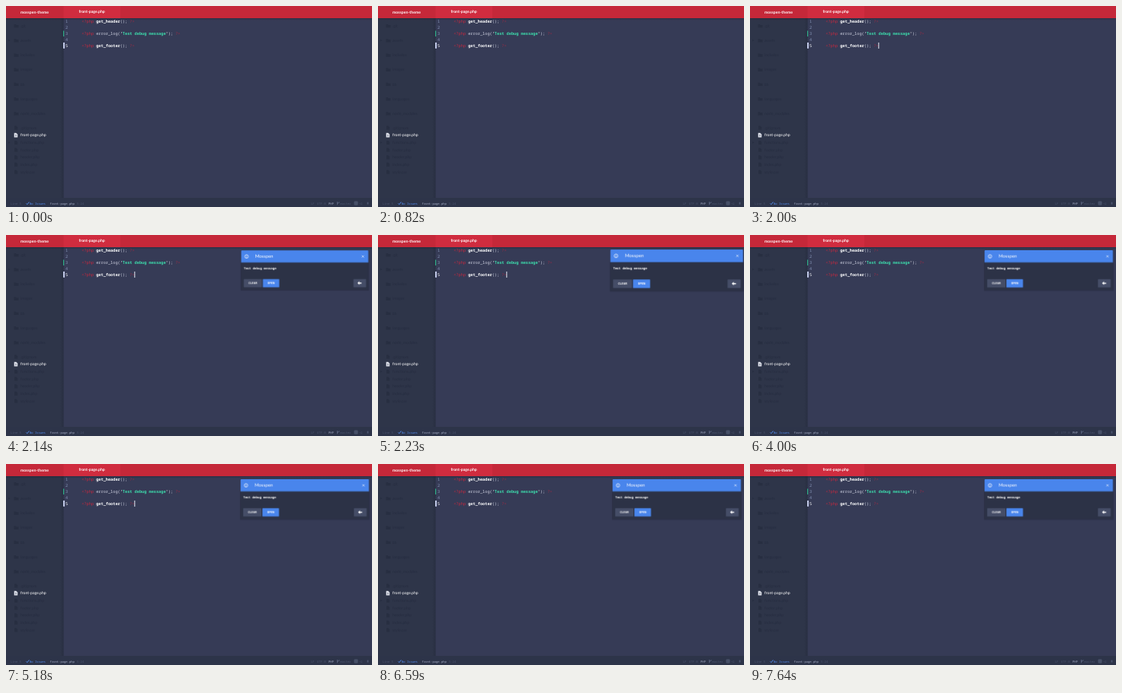
Recreate the animation shown at these times as an HTML page. Size 480x264 px, loop 7.69 s.

```html
<!DOCTYPE html>
<html lang="en">
<head>
<meta charset="utf-8">
<title>Debug notification</title>
<style>
  html, body { margin: 0; width: 100%; height: 100%; overflow: hidden; background: #363b56; }
  svg { display: block; width: 480px; height: 264px; }
  text { font: 5.15px Lato, sans-serif; fill: #fff; white-space: pre; text-rendering: geometricPrecision; }
  .title { font-weight: 700; text-anchor: middle; }
  .code text { font: 5.25px "Noto Sans Mono", monospace; fill: #d3d6e5; }
  .code .num { fill: #8795b8; }
  .code .now { fill: #fff; }
  .tag { fill: #c5293f; }
  .end { fill: #9d2b45; }
  .fn { fill: #fff; font-weight: 700; }
  .str { fill: #3ddcac; font-weight: 600; }
  .dim text { fill: #262d40; }
  .dim { fill: #272e41; }
  .bar text { font: 3.85px "Noto Sans Mono", monospace; fill: #4d5670; }
  .bar .blue { fill: #5590f5; }
  .bar .lit { fill: #a3abc4; }
  .panel .msg { font: 600 4px "Noto Sans Mono", monospace; }
  .panel .btn { font: 700 3.9px "Noto Sans Mono", monospace; text-anchor: middle; }
  .line { fill: none; stroke: #fff; stroke-width: .7; }

  .cursor { animation: blink 7690ms step-end infinite; }
  @keyframes blink {
    0%, 10.62%, 20.64%, 31.3%, 41.31%, 51.98%, 62.64%, 72.65%, 83.32%, 93.33%, 100% { opacity: 0; }
    5.29%, 15.96%, 25.97%, 36.63%, 46.65%, 57.31%, 67.32%, 77.98%, 88.65% { opacity: 1; }
  }
  .panel { transform-origin: 391.7px 46.3px; animation: pop 7690ms ease-in-out infinite; }
  @keyframes pop {
    0%, 27.78% { opacity: 0; transform: scale(.99); }
    27.79% { opacity: 1; transform: scale(.99); }
    28.9% { opacity: 1; transform: scale(1.033); }
    31.9%, 100% { opacity: 1; transform: scale(1); }
  }
</style>
</head>
<body>
<svg viewBox="0 0 480 264">
  <defs>
    <linearGradient id="edge">
      <stop offset="0" stop-color="#252b3d" stop-opacity="0"/>
      <stop offset="1" stop-color="#252b3d" stop-opacity=".6"/>
    </linearGradient>
    <linearGradient id="drop" x2="0" y2="1">
      <stop offset="0" stop-color="#1d2130" stop-opacity=".4"/>
      <stop offset="1" stop-color="#1d2130" stop-opacity="0"/>
    </linearGradient>
  </defs>

  <rect width="480" height="264" fill="#363b56"/>
  <rect width="75.5" height="264" fill="#2e3549"/>
  <rect x="71" width="4.5" height="264" fill="url(#edge)"/>

  <g class="dim" id="tree"></g>
  <path d="M10.7 166.8h2.7l1.8 1.8v3.9h-4.5z" fill="#e4e7f0"/>
  <path d="M12 169.3h2m-2 1.5h2" stroke="#2e3549" stroke-width=".5"/>
  <text x="19" y="171.4">front-page.php</text>

  <g class="code">
    <rect x="75" y="32.5" width="1.2" height="7.5" fill="#2fae88"/>
    <rect x="75" y="48" width="2" height="7.8" fill="#c3cbea"/>
    <text class="num" x="78" y="22.2">1</text>
    <text class="num" x="78" y="30.1">2</text>
    <text class="num" x="78" y="38">3</text>
    <text class="num" x="78" y="45.9">4</text>
    <text class="now" x="78" y="53.8" font-weight="700">5</text>
    <text x="99.3" y="22.2"><tspan class="tag">&lt;?php</tspan> <tspan class="fn">get_header</tspan>(); <tspan class="end">?&gt;</tspan></text>
    <text x="99.3" y="38"><tspan class="tag">&lt;?php</tspan> error_log(<tspan class="fn">'</tspan><tspan class="str">Test debug message</tspan><tspan class="fn">'</tspan>); <tspan class="end">?&gt;</tspan></text>
    <text x="99.3" y="53.8"><tspan class="tag">&lt;?php</tspan> <tspan class="fn">get_footer</tspan>(); <tspan class="end">?&gt;</tspan></text>
    <rect class="cursor" x="168.3" y="48" width="1" height="8" fill="#e9ebf5"/>
  </g>

  <rect y="16" width="480" height="3" fill="url(#drop)"/>
  <rect width="480" height="16" fill="#c52839"/>
  <rect x="75.5" width="74.5" height="16" fill="#d02c3f"/>
  <text class="title" x="37.5" y="9.9">mosspen-theme</text>
  <text class="title" x="112.6" y="9.2">front-page.php</text>

  <g class="bar">
    <rect y="252" width="480" height="12" fill="#2d3449"/>
    <text x="6" y="260.6">Line 5</text>
    <path class="line" d="M26.5 259.3l1.3 1.4 2.5-3.3" style="stroke:#5590f5;stroke-width:.9"/>
    <text class="blue" x="31" y="260.6">No Issues</text>
    <text class="lit" x="57.6" y="260.6">front-page.php</text>
    <text x="93" y="260.6">5:24</text>
    <text x="400" y="260.6">LF</text>
    <text x="408" y="260.6">UTF-8</text>
    <text class="lit" x="423" y="260.6" font-weight="700">PHP</text>
    <path d="M434.5 257v4.2m2.3-4v1.2l-2.3 1.2" fill="none" stroke="#626c88" stroke-width=".8"/>
    <text x="438.5" y="260.6">master</text>
    <path d="M457 257h4v4h-4zM459 257v4m-2-2h4" fill="none" stroke="#626c88" stroke-width=".6"/>
    <text x="463" y="260.6">+2</text>
    <rect x="473.6" y="257.6" width="1.8" height="3" fill="#4d5670"/>
  </g>

  <g class="panel">
    <rect x="306.8" y="20.5" width="170.2" height="53" rx="1" fill="#1c2030" opacity=".3"/>
    <rect x="307.5" y="20" width="168.5" height="52.5" rx="1" fill="#2c3246"/>
    <path d="M307.5 36V21q0-1 1-1h166.5q1 0 1 1v15z" fill="#4985ec"/>
    <circle class="line" cx="314.7" cy="28" r="2.3"/>
    <path class="line" d="M314.7 27.7v1.6m0-2.9v.6"/>
    <text x="326" y="30.1" style="font-size:6px">Mosspen</text>
    <path class="line" d="M467.4 26.6l2.8 2.8m0-2.8l-2.8 2.8" style="stroke-width:.6"/>
    <text class="msg" x="311" y="44.7">Test debug message</text>
    <rect x="311" y="58" width="24" height="11" rx=".6" fill="#454d67"/>
    <text class="btn" x="323" y="64.8">CLEAR</text>
    <rect x="336.3" y="58" width="21.7" height="11" rx=".6" fill="#4985ec"/>
    <text class="btn" x="347.2" y="64.8">OPEN</text>
    <rect x="456.3" y="58" width="16.7" height="11" rx=".6" fill="#454d67"/>
    <path d="M461.6 63.3l2.6-2.3v1.5h2.8v1.6h-2.8v1.5z" fill="#fff"/>
  </g>
</svg>
<script>
  const folders = ['.git', 'assets', 'includes', 'images', 'lib', 'languages', 'node_modules'];
  const files = ['.gitignore', '', 'functions.php', 'footer.php', 'header.php', 'index.php', 'style.css'];
  const folderIcon = 'm10.5-2h2.2l.8.9h3v3.4h-6z';
  const fileIcon = 'm11-2.4h2.5l1.6 1.6v3.4h-4.1z';
  const row = (name, icon, y) => name &&
    `<path d="M0 ${y}${icon}"/><text x="19" y="${y + 1.8}">${name}</text>`;
  const arrow = y => `<path d="M3.2 ${y - 1.4}l2.2 1.4-2.2 1.4z"/>`;

  document.getElementById('tree').innerHTML =
    folders.map((name, i) => row(name, folderIcon, 26 + i * 19.2)).join('') +
    files.map((name, i) => row(name, fileIcon, 160 + i * 9.65)).join('') +
    arrow(45.2) + arrow(179.3);
</script>
</body>
</html>
```
